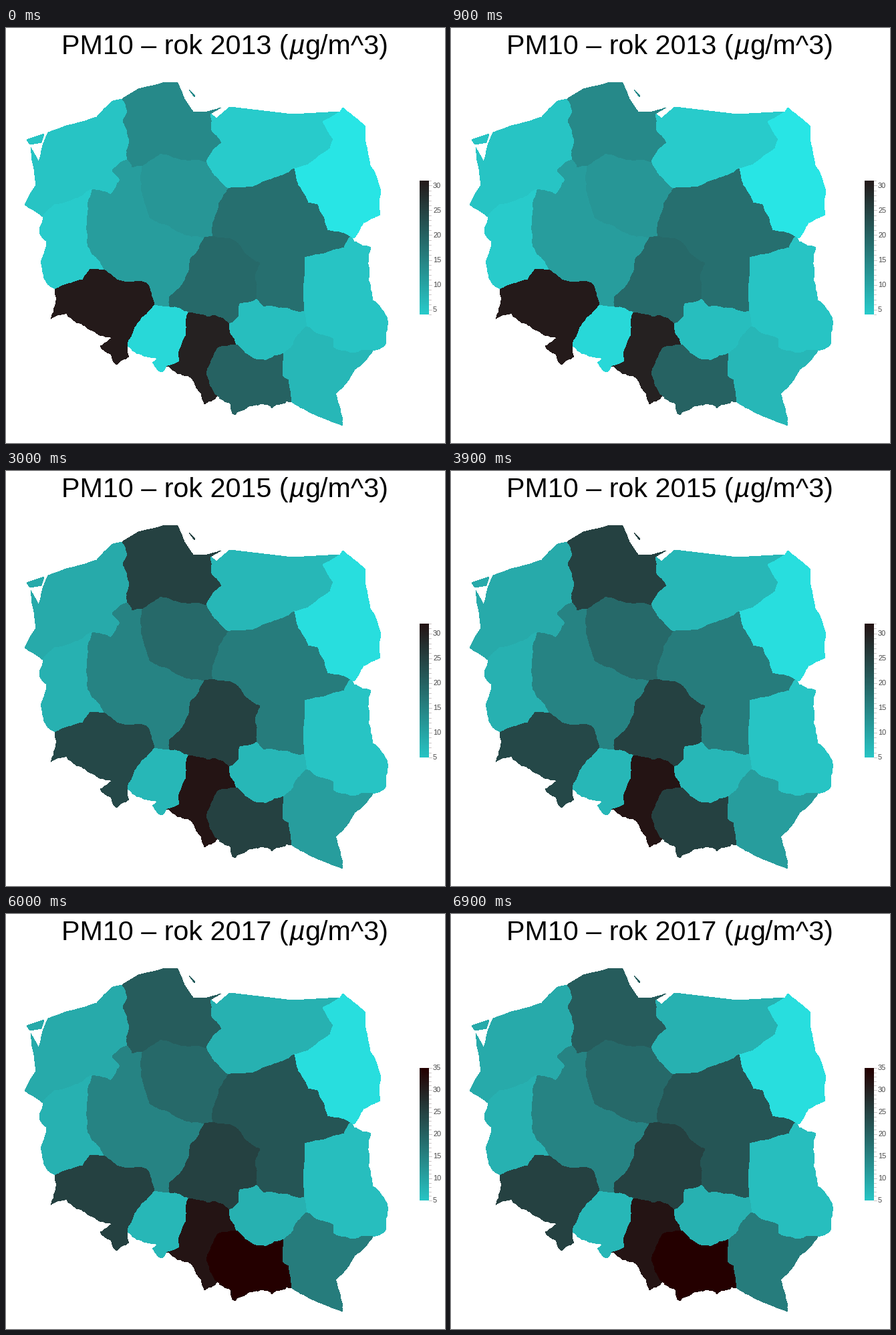
A matplotlib script that plays this animation: 657x620 px, repeating every 7.5 s.

```python
import numpy as np
import matplotlib.pyplot as plt
from matplotlib.animation import FuncAnimation

W, H, DPI = 657, 620, 64
PT = 72 / DPI
rng = np.random.default_rng(16)
borders = []


def crinkle(a, b, rough):
    """Fractal line from a to b by midpoint displacement, without its last point."""
    d = b - a
    if np.hypot(*d) < 5:
        return [a]
    mid = (a + b) / 2 + np.array([-d[1], d[0]]) * rng.uniform(-rough, rough)
    return crinkle(a, mid, rough) + crinkle(mid, b, rough)


def border(regions, *points, rough=0.09):
    """Store a crinkled line shared by the named regions."""
    pts = np.array(points, float)
    line = [p for a, b in zip(pts, pts[1:]) for p in crinkle(a, b, rough)]
    borders.append((regions.split(), np.array(line + [pts[-1]])))


def outline(code):
    """Chain all borders of one region into a closed ring."""
    parts = [line for names, line in borders if code in names]
    ring = parts.pop(0)
    while parts:
        dist = lambda p: np.hypot(*(p - ring[-1]))
        k = min(range(len(parts)),
                key=lambda j: min(dist(parts[j][0]), dist(parts[j][-1])))
        part = parts.pop(k)
        if dist(part[-1]) < dist(part[0]):
            part = part[::-1]
        ring = np.vstack([ring, part])
    return ring


# Points where three areas meet
zp_pm, pm_wm, wm_pd, pd_lu = (174, 106), (306, 128), (500, 125), (515, 312)
lu_pk, pk_ma, ma_sl, sl_op = (549, 482), (428, 559), (316, 549), (240, 505)
op_ds, ds_lb, lb_zp = (182, 475), (74, 390), (55, 282)
zp_lb_wp, zp_pm_wp, pm_kp_wp, pm_kp_wm = (130, 241), (182, 197), (204, 207), (300, 201)
kp_wm_mz, wm_pd_mz, kp_ld_wp, kp_ld_mz = (333, 240), (431, 210), (297, 313), (309, 311)
ld_mz_sk, ld_sl_sk, ld_sl_op, ld_wp_op = (375, 405), (334, 442), (273, 425), (245, 417)
wp_op_ds, lb_wp_ds, sl_sk_ma, sk_ma_pk = (222, 414), (148, 362), (345, 473), (416, 486)
sk_lu_pk, mz_sk_lu = (449, 446), (447, 424)

# Coast and national border, clockwise from the north-west
border("pm", zp_pm, (198, 91), (238, 81), (257, 82), (267, 106), (280, 125),
       (298, 126), (322, 119), pm_wm, rough=0.02)
border("wm", pm_wm, (315, 135), (335, 118), (428, 129), wm_pd, rough=0)
border("pd", wm_pd, (504, 119), (538, 148), (538, 170), (560, 240), (560, 279),
       (535, 291), (521, 314), pd_lu, rough=0.06)
border("lu", pd_lu, (521, 319), (546, 328), (542, 376), (549, 407), (571, 437),
       (567, 474), lu_pk)
border("pk", lu_pk, (522, 510), (493, 547), (504, 594), (483, 586), (456, 575),
       pk_ma, rough=0.06)
border("ma", pk_ma, (398, 568), (370, 564), (343, 578), (336, 562), ma_sl, rough=0.2)
border("sl", ma_sl, (296, 562), (276, 522), sl_op, rough=0.15)
border("op", sl_op, (233, 514), (219, 500), (228, 494), (200, 487), op_ds, rough=0.12)
border("ds", op_ds, (184, 491), (166, 503), (141, 475), (159, 463), (124, 450),
       (91, 427), (67, 435), ds_lb, rough=0.12)
border("lb", ds_lb, (60, 379), (53, 353), (60, 318), (50, 306), lb_zp)
border("zp", lb_zp, (28, 264), (45, 235), (37, 178), (49, 200), (54, 179), (63, 156),
       (90, 146), (136, 133), (158, 110), zp_pm, rough=0.03)

# Lines between regions
border("zp pm", zp_pm, (182, 126), (175, 140), (185, 168), zp_pm_wp)
border("zp lb", lb_zp, (72, 264), (108, 254), zp_lb_wp)
border("zp wp", zp_lb_wp, (157, 249), (171, 227), (159, 213), zp_pm_wp)
border("pm wp", zp_pm_wp, (188, 208), pm_kp_wp)
border("pm kp", pm_kp_wp, (232, 188), (270, 198), pm_kp_wm)
border("pm wm", pm_wm, (307, 150), (323, 172), pm_kp_wm)
border("wm pd", wm_pd, (474, 140), (490, 166), (485, 180), (452, 204), wm_pd_mz,
       rough=0.04)
border("kp wm", pm_kp_wm, (312, 221), kp_wm_mz)
border("wm mz", wm_pd_mz, (397, 226), (370, 237), kp_wm_mz, rough=0.06)
border("kp mz", kp_wm_mz, (319, 261), kp_ld_mz)
border("kp wp", pm_kp_wp, (207, 258), (215, 283), (245, 296), (260, 305), kp_ld_wp)
border("kp ld", kp_ld_wp, kp_ld_mz)
border("pd mz", wm_pd_mz, (437, 235), (452, 261), (466, 264), (481, 302), pd_lu,
       rough=0.06)
border("mz lu", pd_lu, (506, 328), (447, 343), (447, 371), mz_sk_lu, rough=0.04)
border("mz sk", mz_sk_lu, (415, 419), (385, 416), ld_mz_sk)
border("ld mz", kp_ld_mz, (342, 318), (380, 351), (372, 371), ld_mz_sk)
border("ld sk", ld_mz_sk, (350, 412), (349, 431), ld_sl_sk)
border("ld sl", ld_sl_op, (300, 431), (312, 429), ld_sl_sk)
border("ld wp", kp_ld_wp, (276, 345), (275, 360), (258, 390), (244, 402), ld_wp_op)
border("ld op", ld_sl_op, ld_wp_op)
border("wp op", ld_wp_op, wp_op_ds)
border("lb wp", zp_lb_wp, (122, 280), (122, 325), (135, 342), lb_wp_ds)
border("lb ds", ds_lb, (115, 376), (126, 360), lb_wp_ds, rough=0.06)
border("wp ds", lb_wp_ds, (166, 376), (210, 381), wp_op_ds)
border("ds op", wp_op_ds, (198, 440), op_ds)
border("op sl", sl_op, (260, 498), (258, 485), (270, 460), ld_sl_op)
border("sl sk", ld_sl_sk, (336, 456), sl_sk_ma)
border("sl ma", sl_sk_ma, (317, 478), (300, 516), ma_sl)
border("sk ma", sl_sk_ma, (374, 495), (388, 497), sk_ma_pk)
border("sk pk", sk_ma_pk, (430, 473), sk_lu_pk)
border("sk lu", mz_sk_lu, sk_lu_pk)
border("lu pk", sk_lu_pk, (489, 464), (489, 477), (516, 486), lu_pk)
border("ma pk", sk_ma_pk, (415, 520), (423, 525), pk_ma, rough=0.04)

# PM10 by region for 2013 to 2017
LEVELS = {
    "zp": (5, 9, 9, 9, 9), "pm": (14, 25, 25, 23, 21), "wm": (4, 7, 7, 7, 8),
    "pd": (0, 0, 1, 1, 1), "lb": (4, 8, 8, 8, 8), "wp": (11, 11, 15, 15, 15),
    "kp": (12, 16, 19, 18, 19), "mz": (18, 17, 16, 19, 22),
    "ld": (19, 23, 25, 23, 25), "lu": (5, 4, 5, 5, 6), "ds": (31, 23, 24, 26, 25),
    "op": (2, 7, 7, 7, 7), "sl": (30, 32, 32, 32, 32), "sk": (6, 7, 7, 6, 8),
    "ma": (20, 28, 25, 33, 35), "pk": (7, 11, 11, 13, 16),
}
shapes = [(code, outline(code)) for code in LEVELS]
# Small spit and island off the coast
shapes += [("pm", np.array([(274, 92), (283, 101), (282, 103)])),
           ("zp", np.array([(31, 167), (57, 158), (53, 171), (36, 174)]))]


def shade(v):
    """Cyan at 0 falling to a very dark red at 35."""
    t = np.asarray(v) / 35
    g = 229 * (1 - t)
    return np.stack([40 - 4 * t, g, g], axis=-1) / 255


fig = plt.figure(figsize=(W / DPI, H / DPI), dpi=DPI, facecolor="white")
ax = fig.add_axes([0, 0, 1, 1])


def write(x, y, text, px, **kw):
    ax.text(x, y, text, fontsize=px * PT, family="Liberation Sans", **kw)


def draw_legend(lo, hi):
    # A label at the very top needs a little more room
    bottom, top = 428, 228 if hi % 5 else 230
    ramp = shade(np.linspace(hi, lo, 200))[:, None]
    ax.imshow(ramp, extent=(619, 633, bottom, top), aspect="auto",
              interpolation="nearest")
    for v in range(lo, hi + 1):
        y = bottom + (top - bottom) * (v - lo) / (hi - lo)
        major = v % 5 == 0
        ax.plot([633, 637 if major else 635.5], [y, y], color="#a89c9c", lw=0.6 * PT)
        if major:
            write(639, y + 3.4, str(v), 11, color="#484848")


def draw(i):
    level = {code: values[i] for code, values in LEVELS.items()}
    ax.clear()
    ax.axis("off")
    for code, ring in shapes:
        ax.fill(*ring.T, facecolor=shade(level[code]), lw=0, antialiased=False)
    draw_legend(min(level.values()) + 4, max(level.values()))
    write(83, 39, f"PM10 – rok {2013 + i} (", 41.2)
    write(423.5, 39, "µ", 41.2, style="italic")
    write(447, 39, "g/m^3)", 41.2)
    ax.set_xlim(0, W)
    ax.set_ylim(H, 0)
    return []


anim = FuncAnimation(fig, draw, frames=5, init_func=lambda: [],
                     interval=1500, repeat=True, repeat_delay=0)
plt.show()
```
